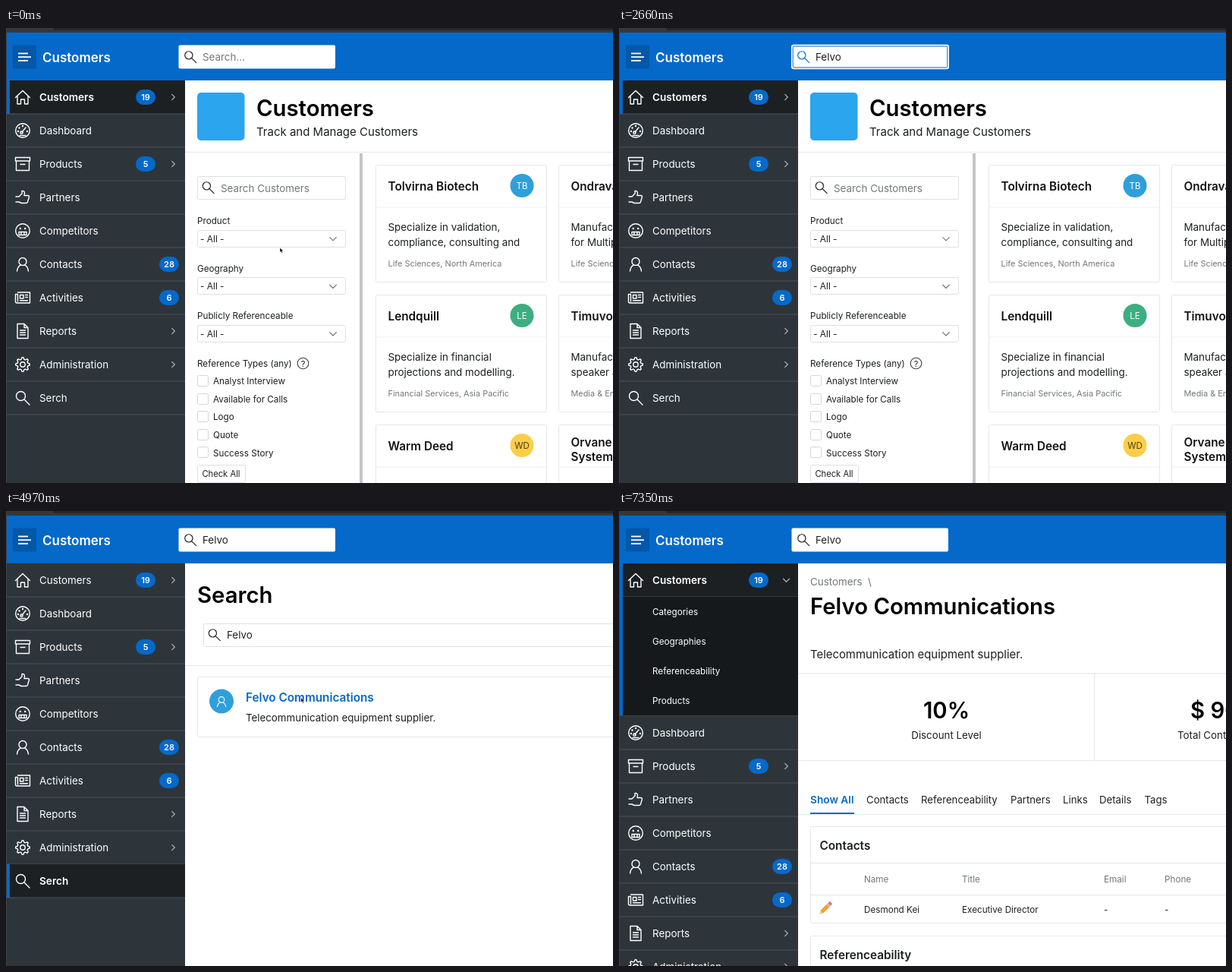
An HTML page for the animation above (7.56 s loop, 800x599 px).

```html
<!DOCTYPE html>
<html lang="en">
<head>
<meta charset="utf-8">
<title>Customers</title>
<style>
html, body { margin: 0; width: 100%; height: 100%; overflow: hidden; background: #fff; }
svg { display: block; width: 100vw; height: 100vh; font-family: Inter, Roboto, sans-serif; }
.icon { fill: none; stroke-width: 1.4; stroke-linejoin: round; stroke-linecap: round; }
</style>
</head>
<body>
<svg id="stage" viewBox="0 0 800 599"></svg>
<script>
const LOOP = 7560, STEP = 70;
const BLUE = '#0469c9', INK = '#1d1f20', GREY = '#74777a', RULE = '#e6e7e8';
const QUERY = 'Felvo', COMPANY = 'Felvo Communications';
const ABOUT = 'Telecommunication equipment supplier.';

// y is the middle of the capital letters
const text = (x, y, s, size = 13.4, fill = INK, weight = 400, anchor = 'start') =>
  `<text x="${x}" y="${y + size * .364}" font-size="${size}" fill="${fill}" font-weight="${weight}" text-anchor="${anchor}">${s}</text>`;
const title = (x, y, s, anchor) => text(x, y, s, 29.3, '#000', 600, anchor);
const subtitle = (x, y, s, fill = INK) => text(x, y, s, 15.3, fill, 600);
const rect = (x, y, w, h, fill, r = 0, stroke = 'none') =>
  `<rect x="${x}" y="${y}" width="${w}" height="${h}" rx="${r}" fill="${fill}" stroke="${stroke}"/>`;
const box = (x, y, w, h, r = 2, stroke = '#dfe0e1') => rect(x + .5, y + .5, w, h, '#fff', r, stroke);
const hline = (x, y, w = 800 - x, c = RULE) => rect(x, y, w, 1, c);
const disc = (x, y, r, fill) => `<circle cx="${x}" cy="${y}" r="${r}" fill="${fill}"/>`;
const list = (items, f) => items.map(f).join('');

const ring = (x, y, r) => `M${x - r} ${y}a${r} ${r} 0 1 0 ${2 * r} 0a${r} ${r} 0 1 0 ${-2 * r} 0`;
const dot = (x, y) => ring(x, y, .5);
const gear = Array.from({ length: 32 }, (_, i) => {
  const a = (i - .5) * Math.PI / 16, r = i % 4 < 2 ? 9.3 : 7;
  return `${i ? 'L' : 'M'}${(r * Math.sin(a)).toFixed(1)} ${(-r * Math.cos(a)).toFixed(1)}`;
}).join('') + 'Z';
const sheet = 'M-7 -9.5H2L7 -4.5V9.5H-7ZM2 -9.5V-4.5H7';
const paths = {
  home: 'M-9.5 .5L0 -8.5L9.5 .5M-7 -1.5V9H-2.5V3H2.5V9H7V-1.5',
  dash: ring(0, 0, 9.3) + 'M-1 2L4 -4' + ring(-1.5, 2.5, 1.6) + dot(-6, 1) + dot(-4.5, -3.5) + dot(0, -6) + dot(6, 1) + 'M-4 6.5H4',
  box: 'M-9.5 -8.5H9.5V-4H-9.5ZM-8.5 -4V8.5H8.5V-4M-3 .5H3',
  thumb: 'M-9 -1H-5L-1 -5V-8.5Q2.5 -9 2.5 -5.5L2 -2.5H7Q9 -2 8.3 0L6.5 6Q6 7.5 4.5 7.5H-2L-5 6H-9',
  face: ring(0, 0, 9.3) + dot(-3.2, -3) + dot(3.2, -3) + 'M-5 1.5H5V5.5H-5ZM-2 1.5V5.5M2 1.5V5.5',
  user: ring(0, -3.5, 5) + 'M-7.5 9Q-6.5 2.5 -2.5 1.2M7.5 9Q6.5 2.5 2.5 1.2',
  news: 'M-6.5 -7H9.5V7H-7.5Q-9.5 7 -9.5 5V-4.5H-6.5V5M-3.5 -3.5H1V1H-3.5ZM3.5 -3.5H6.5M3.5 -.5H6.5M-3.5 3.8H6.5',
  sheet,
  report: sheet + 'M-3.5 -1H3.5M-3.5 2H3.5M-3.5 5H3.5',
  gear: gear + ring(0, 0, 3.2),
  find: ring(-2.5, -2.5, 6) + 'M2 2L9 9',
  right: 'M-2 -4L2 0L-2 4',
  down: 'M-4.5 -2L0 2.5L4.5 -2'
};
const icon = (name, x, y, color = '#fff', scale = 1) =>
  `<path class="icon" d="${paths[name]}" stroke="${color}" transform="translate(${x} ${y}) scale(${scale})"/>`;

const entries = [
  ['Customers', 'home', 19, 184, 1], ['Dashboard', 'dash'], ['Products', 'box', 5, 184, 1],
  ['Partners', 'thumb'], ['Competitors', 'face'], ['Contacts', 'user', 28, 215],
  ['Activities', 'news', 6, 215], ['Reports', 'report', 0, 0, 1],
  ['Administration', 'gear', 0, 0, 1], ['Serch', 'find']
];

// raw: the menu before its badges and special icons have loaded
function menu({ selected = -1, open = false, raw = false }) {
  let out = rect(0, 69, 236, 530, '#2e353a');
  entries.forEach(([label, glyph, count, bx, arrow], i) => {
    const top = 69 + 44 * i + (open && i ? 157 : 0), y = top + 22, on = i === selected;
    if (on) out += rect(0, top, 236, 44, '#1d2022');
    out += hline(0, top + 43.5, 236, '#4a5156');
    if (raw && (glyph === 'dash' || glyph === 'face')) glyph = 'sheet';
    out += icon(glyph, 22, y) + text(44, y + .5, label, on ? 13.6 : 13.4, '#fff', on ? 600 : 400);
    if (!raw && count) out += rect(bx - 13, y - 10, 26, 20, BLUE, 10) + text(bx, y + .3, count, 11, '#fff', 600, 'middle');
    if (!raw && arrow) out += icon(open && !i ? 'down' : 'right', 220.5, y, '#a9adb0', .9);
  });
  if (open) {
    out += rect(0, 113, 236, 156, '#16191b') + hline(0, 269, 236, '#3c4347');
    out += list(['Categories', 'Geographies', 'Referenceability', 'Products'],
      (s, i) => text(44, 132.5 + 39.2 * i, s, 11.7, '#fff'));
  }
  if (selected >= 0) out += rect(1, 69 + 44 * selected, 4, open ? 200 : 44, BLUE);
  return out;
}

function header(raw) {
  return rect(0, 0, 800, 69, BLUE) + rect(0, 0, 800, 6, '#35383a') + rect(62, -4, 760, 7, '#25282a', 4) +
    rect(0, 0, 1, 599, '#3f4447') +
    (raw ? '' : rect(9, 22.5, 31, 31, '#0358a8', 2)) +
    list([[33.5, 13], [38.2, 17], [43, 13]], ([y, w]) => rect(16, y - .9, w, 1.8, '#fff')) +
    text(48, 38.5, 'Customers', 17, '#fff', 600);
}

function card(x, y, name, body, meta, badge, color, ink = '#fff') {
  return box(x, y, 225, 154, 2, '#e6e7e8') + hline(x + 1, y + 55.5, 224, '#efeff0') +
    list(name, (s, i) => subtitle(x + 16.5, y + 28 - (name.length - 1) * 5 + 19.5 * i, s, '#111')) +
    (badge ? disc(x + 193, y + 27.5, 15.5, color) + text(x + 193, y + 28, badge, 11.5, ink, 400, 'middle') : '') +
    list(body, (s, i) => text(x + 16.5, y + 82 + 20 * i, s)) +
    text(x + 16.5, y + 130.5, meta, 10.9, GREY);
}

function homePage() {
  return rect(252, 85, 62.5, 63, '#2aa5ee', 5) +
    title(330, 105.7, 'Customers') +
    text(330, 136.5, 'Track and Manage Customers', 15) +
    hline(236, 163) + rect(466, 165, 4, 434, '#c3c5c7') +
    box(252, 195, 195, 30) + icon('find', 266.5, 210, INK, .85) + text(283, 211, 'Search Customers', 13.4, GREY) +
    list(['Product', 'Geography', 'Publicly Referenceable'], (s, i) => {
      const y = 254 + 62.6 * i;
      return text(252, y, s, 11.7) + box(252, Math.round(y + 11.5), 195, 22) +
        text(256, y + 23.5, '- All -', 11.9) + icon('down', 431, y + 23.5, '#7d8082', .95);
    }) +
    text(252, 442, 'Reference Types (any)', 11.7) +
    `<path class="icon" d="${ring(391.5, 441.5, 7.3)}" stroke="#444" style="stroke-width:1.1"/>` +
    text(391.5, 441.5, '?', 11, INK, 400, 'middle') +
    list(['Analyst Interview', 'Available for Calls', 'Logo', 'Quote', 'Success Story'], (s, i) => {
      const y = 465 + 23.6 * i;
      return box(252, Math.round(y - 8), 14, 14, 2, '#d5d6d7') + text(273, y, s, 11.7);
    }) +
    box(252, 575, 63, 23) + text(283.5, 587, 'Check All', 11.2, INK, 400, 'middle') +
    card(487, 180, ['Tolvirna Biotech'], ['Specialize in validation,', 'compliance, consulting and'],
      'Life Sciences, North America', 'TB', '#2f9fdb') +
    card(487, 351, ['Lendquill'], ['Specialize in financial', 'projections and modelling.'],
      'Financial Services, Asia Pacific', 'LE', '#3cae82') +
    card(487, 522, ['Warm Deed'], [], '', 'WD', '#fbce4a', '#4a3c10') +
    card(728, 180, ['Ondrava'], ['Manufacturing', 'for Multiple'], 'Life Sciences') +
    card(728, 351, ['Timuvo'], ['Manufacturing', 'speaker and'], 'Media &amp; Entertainment') +
    card(728, 522, ['Orvane', 'Systems'], [], '');
}

function searchPage() {
  return title(252, 110, 'Search') +
    box(260, 148, 560, 30) + icon('find', 274.5, 163, INK, .85) + text(291, 163.5, QUERY) +
    hline(236, 203) + box(252, 218, 560, 79, 3, '#e6e7e8') +
    disc(284, 250.5, 16, '#2f9fdb') + icon('user', 284, 251, '#fff', .75) +
    subtitle(316, 245, COMPANY, BLUE) + text(316, 272.3, ABOUT, 13.3);
}

const intro = () => text(252, 93.5, 'Customers', 13.4, GREY) + text(328, 93.5, '\\', 13.4, GREY) +
  title(252, 125.5, COMPANY) + text(252, 189, ABOUT, 14.9) +
  hline(236, 213.5, 564, '#e0e1e2');

function detailsPage() {
  const rows = [['Status', 'Customer'], ['Type', 'Production'], ['Web Site(s)', 'http://www.felvocom.com'],
    ['Marquee Customer', 'No'], ['Category', 'Corporate'], ['Industry', 'Communications'], ['Geography', 'Asia Pacific']];
  return intro() + hline(236, 286) + box(252, 302, 560, 320, 2, RULE) +
    subtitle(264.5, 326.5, 'Details') + hline(253, 349) +
    list(rows, ([k, v], i) => {
      const y = 368.7 + 36.2 * i;
      return text(264.5, y, k) + text(547, y, v, 13.2, i === 2 ? BLUE : '#333') + hline(253, Math.round(y + 17.5));
    });
}

function customerPage() {
  const tabs = [['Contacts', 326], ['Referenceability', 398], ['Partners', 516], ['Links', 585], ['Details', 633], ['Tags', 692.5]];
  const cells = [['Name', 323, 'Desmond Kei'], ['Title', 452, 'Executive Director'], ['Email', 639, '-'], ['Phone', 719, '-']];
  return intro() + rect(626, 214, 1, 114, RULE) + hline(236, 328) +
    title(431.5, 262.5, '10%', 'middle') + text(431.5, 295.5, 'Discount Level', 13.3, INK, 400, 'middle') +
    title(753, 262.5, '$ 90,000') + text(736, 295.5, 'Total Contract Value', 13.3) +
    hline(236, 399) + rect(252, 397, 58, 2, BLUE) + text(252, 380.5, 'Show All', 13.7, BLUE, 600) +
    list(tabs, ([s, x]) => text(x, 380.5, s, 13.2)) +
    box(252, 415, 560, 127, 2, RULE) + subtitle(264.5, 440, 'Contacts') + hline(253, 463) + hline(253, 505) +
    list(cells, ([head, x, value]) => text(x, 485, head, 11.7, GREY) + text(x, 525, value, 11.7)) +
    `<g transform="translate(265 530) rotate(-45)">` + rect(3, -2.5, 12, 5, '#f5a12c') + rect(15, -2.5, 2, 5, '#b9bec2') +
    rect(17, -2.5, 3.5, 5, '#ee6a73', 1) + `<path d="M3 -2.5L-1 0L3 2.5Z" fill="#e9c79a"/></g>` +
    box(252, 559, 560, 80, 2, RULE) + subtitle(264.5, 584, 'Referenceability');
}

// start time, page, menu state, text areas where the pointer is an I-beam [x, y, w, h]
const scenes = [
  { at: 0, page: homePage, menu: { selected: 0 }, areas: [[252, 195, 196, 31], [330, 93, 157, 26], [330, 130, 212, 14]] },
  { at: 3080, page: searchPage, menu: { raw: true }, areas: [[260, 148, 540, 31], [252, 96, 100, 26]] },
  { at: 3150, page: searchPage, menu: { selected: 9 }, areas: [[260, 148, 540, 31], [252, 96, 100, 26]] },
  { at: 5530, page: detailsPage, menu: { raw: true }, areas: [] },
  { at: 5600, page: customerPage, menu: { selected: 0, open: true }, areas: [[252, 180, 282, 18], [252, 112, 322, 28]] }
];
const field = [227, 22, 208, 32];

const stage = document.getElementById('stage');
stage.innerHTML = list(scenes, s => `<g class="scene">${s.page()}${menu(s.menu)}${header(s.menu.raw)}</g>`) +
  rect(227.5, 22.5, 206.5, 31, '#fff', 2) +
  `<g id="focus">${rect(227, 21.8, 208, 32.4, '#fff', 3)}${rect(229.2, 24, 203.6, 28, 'none', 1.5, BLUE)}</g>` +
  `<g id="lens">${icon('find', 243, 38, 'currentColor', .85)}</g>` +
  `<g id="entry">${text(259, 38.5, '')}</g><g id="caret">${rect(0, 30, 1, 16, '#111')}</g>` +
  `<path id="arrow" d="M0 0V6.4L1.5 5.2L2.6 7.6L3.7 7.1L2.7 4.8H4.6Z" fill="#000" stroke="#fff" stroke-width=".6"/>` +
  `<path id="beam" class="icon" d="M-2 -5.5Q0 -5.5 0 -4V4Q0 5.5 -2 5.5M2 -5.5Q0 -5.5 0 -4M0 4Q0 5.5 2 5.5" stroke="#222" style="stroke-width:1"/>`;
const groups = [...stage.querySelectorAll('.scene')];
const [focus, lens, caret, arrow, beam] = ['focus', 'lens', 'caret', 'arrow', 'beam'].map(id => document.getElementById(id));
const entry = document.querySelector('#entry text');
const show = (el, on) => { el.style.display = on ? '' : 'none'; };

// pointer stops: time, x, y
const stops = [[0, 361, 289], [980, 288, 43], [1190, 286, 42], [2870, 286, 42], [3780, 403, 188], [3990, 399, 240],
  [4130, 399, 240], [4340, 392, 246], [4830, 392, 246], [5530, 361, 236], [5670, 367, 190], [6370, 395, -14], [LOOP, 395, -14]];
const slope = (i, k) => (stops[i + 1][k] - stops[i][k]) / (stops[i + 1][0] - stops[i][0]);
function tangent(i, k) {
  if (!i || i === stops.length - 1) return 0;
  const a = slope(i - 1, k), b = slope(i, k);
  return a * b > 0 ? 2 * a * b / (a + b) : 0;
}
function pointerAt(t) {
  const i = stops.findIndex((s, n) => n < stops.length - 1 && t < stops[n + 1][0]);
  const [t0] = stops[i], span = stops[i + 1][0] - t0, u = (t - t0) / span;
  return [1, 2].map(k =>
    stops[i][k] * (1 + 2 * u) * (1 - u) ** 2 + stops[i + 1][k] * u * u * (3 - 2 * u) +
    span * (tangent(i, k) * u * (1 - u) ** 2 - tangent(i + 1, k) * u * u * (1 - u)));
}

function draw(t) {
  const now = scenes.findLastIndex(s => t >= s.at);
  groups.forEach((g, i) => show(g, i === now));

  const focused = t >= 1330 && t < 3080;
  const typed = QUERY.slice(0, Math.max(0, Math.floor((t - 1890) / STEP) + 1));
  entry.textContent = typed || 'Search...';
  entry.setAttribute('fill', typed ? INK : GREY);
  show(focus, focused);
  lens.style.color = focused ? BLUE : INK;
  const blinkStart = t < 1890 ? 1400 : Math.min(t, 2170);
  show(caret, focused && t >= 1400 && (t - blinkStart) % 980 < 490);
  caret.setAttribute('transform', `translate(${typed ? 259.5 + entry.getComputedTextLength() : 259} 0)`);

  const [x, y] = pointerAt(t), visible = t < 1890 || t >= 2870;
  const overText = [field, ...scenes[now].areas].some(([l, p, w, h]) => x >= l && x <= l + w && y >= p && y <= p + h);
  for (const el of [arrow, beam]) el.setAttribute('transform', `translate(${x} ${y})`);
  show(arrow, visible && !overText);
  show(beam, visible && overText);
}

const start = performance.now();
function tick() {
  const t = (performance.now() - start) % LOOP;
  draw(Math.floor(t / STEP) * STEP);
  requestAnimationFrame(tick);
}
tick();
</script>
</body>
</html>
```
